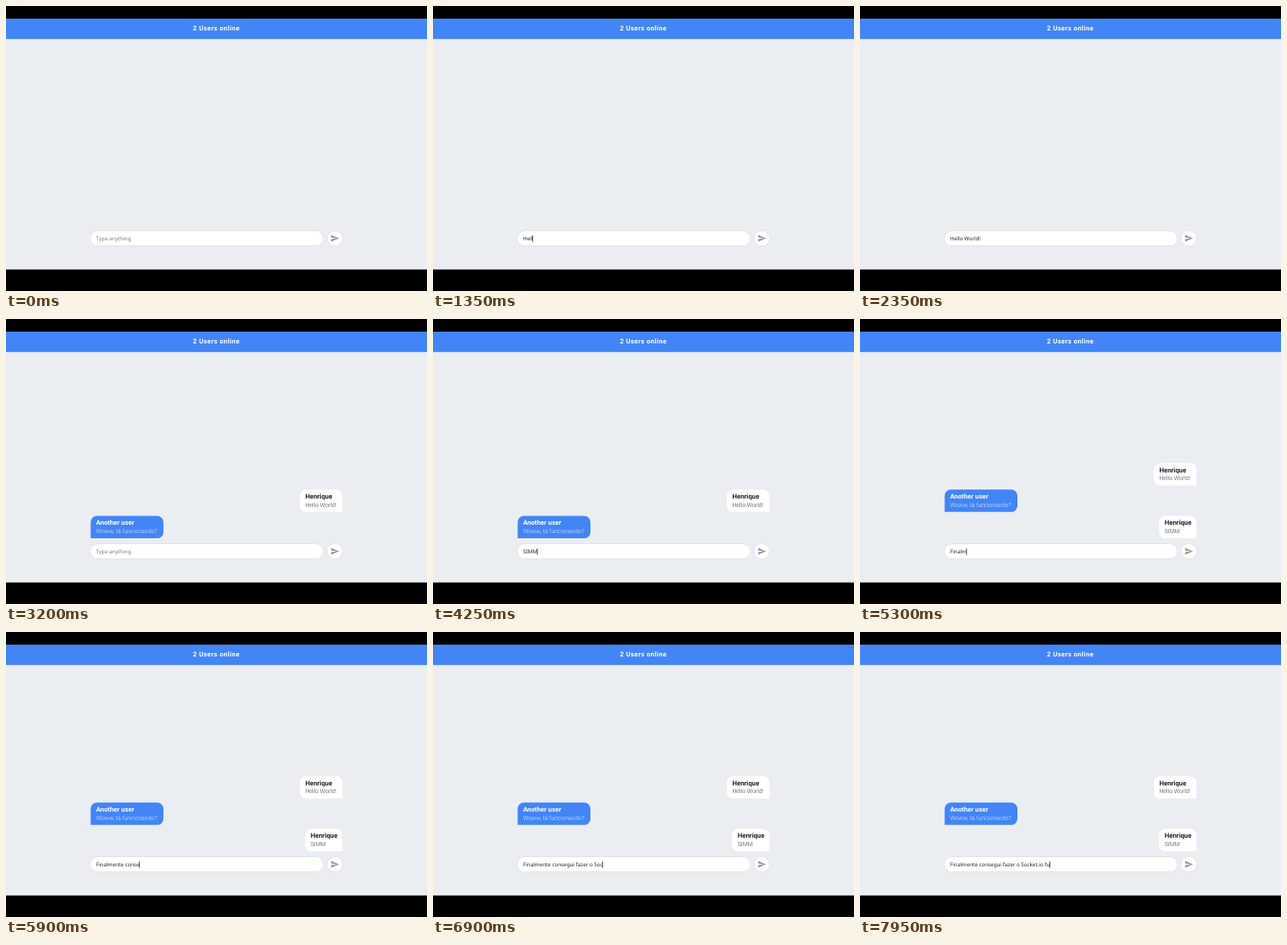
These frames come from a looping animation (500x338 px, 8000 ms). An HTML page:

```html
<!DOCTYPE html>
<html lang="pt">
<head>
<meta charset="utf-8">
<title>Chat</title>
<style>
  html, body { margin: 0; width: 100%; height: 100%; overflow: hidden; background: #000; }
  svg { display: block; width: 500px; height: 338px; }
  text { white-space: pre; font: 300 7.03px Roboto, sans-serif; text-rendering: geometricPrecision; }
  .title { font-size: 7.81px; font-weight: 700; letter-spacing: .39px; fill: #fff; }
  .name { font-size: 7.81px; font-weight: 700; }
  .own path { fill: #fff; }
  .own text { fill: #3a3d44; }
  .own .name { fill: #1d2029; }
  .other path { fill: #4285f7; }
  .other text { fill: #e6effe; }
  .other .name { fill: #fff; }
  .field { fill: #fff; filter: drop-shadow(0 .8px .6px rgba(0, 0, 0, .35)); }
  #input { font: 400 6.25px "Noto Sans", sans-serif; }
</style>
</head>
<body>
<svg viewBox="0 0 500 338">
  <rect y="15" width="500" height="297.5" fill="#eaeef3"/>
  <rect y="15" width="500" height="24.2" fill="#4285f7"/>
  <text class="title" x="222" y="29">2 Users online</text>
  <g id="messages"></g>
  <rect class="field" x="100" y="266.8" width="277" height="17.6" rx="8.8"/>
  <text id="input" x="107" y="278"></text>
  <rect id="caret" y="272" width=".7" height="7.8" fill="#222"/>
  <circle class="field" cx="390.6" cy="275.6" r="9.2"/>
  <path fill="#999" transform="translate(385.2 270.1) scale(.45)" d="M2 21 23 12 2 3v7l15 2-15 2z"/>
</svg>
<script>
const LOOP = 8000, TICK = 50, SLOT = 31.25;
const TEXT_X = 107;

const messages = [
  { at: 2650, own: true, name: 'Henrique', text: 'Hello World!', left: 348.9, right: 399.5 },
  { at: 3200, own: false, name: 'Another user', text: 'Woww, tá funcionando?', left: 100.5, right: 187 },
  { at: 4450, own: true, name: 'Henrique', text: 'SIMM', left: 355.2, right: 399.5 },
];

// Bursts of typing: text, time of first key, time of last key
const bursts = [
  ['H', 900, 900], ['el', 1050, 1150], ['lo', 1350, 1450], [' World', 1650, 2000], ['!', 2200, 2200],
  ['SIMM', 4000, 4250],
  ['Final', 4550, 4850], ['mente', 5300, 5550], [' conse', 5700, 5900], ['gui', 5950, 6050],
  [' fa', 6200, 6250], ['zer o Soc', 6400, 6900], ['ket', 7100, 7200], ['.', 7550, 7550], ['io fu', 7700, 7950],
];
const sends = [0, 2650, 4450];
const caretOff = [[0, 550], [2350, 2650], [2950, 3550]];

const input = document.getElementById('input');
const caret = document.getElementById('caret');
const list = document.getElementById('messages');

// Rounded bubble with one square bottom corner on the sender's side
function bubble({ own, name, text, left, right }) {
  const w = right - left, h = 26.5, r = 7.4;
  const corner = (x, y, square) => square ? `l${x} 0 0 ${y}` : `a${r} ${r} 0 0 1 ${x} ${y}`;
  const d = `M${r} 0H${w - r}a${r} ${r} 0 0 1 ${r} ${r}V${h - r}` +
    (own ? `V${h}H${r}` : `a${r} ${r} 0 0 1 ${-r} ${r}H0`) +
    (own ? `a${r} ${r} 0 0 1 ${-r} ${-r}` : '') + `V${r}a${r} ${r} 0 0 1 ${r} ${-r}z`;
  return `<g class="${own ? 'own' : 'other'}"><path d="${d}"/>` +
    `<text class="name" x="6.5" y="10.8">${name}</text><text x="6.5" y="20.4">${text}</text></g>`;
}

list.innerHTML = messages.map(bubble).join('');

function typedAt(t) {
  const since = sends.findLast(s => s <= t);
  return bursts.filter(b => b[1] >= since).map(([text, start, end]) => {
    const gap = (end - start) / Math.max(1, text.length - 1);
    return t < start ? '' : text.slice(0, gap ? Math.floor((t - start) / gap + 1.001) : 1);
  }).join('');
}

function draw(t) {
  const sent = messages.filter(m => m.at <= t).length;
  messages.forEach((m, i) => {
    const g = list.children[i];
    g.style.display = i < sent ? '' : 'none';
    g.setAttribute('transform', `translate(${m.left} ${233.6 - (sent - 1 - i) * SLOT})`);
  });

  const typed = typedAt(t);
  input.textContent = typed || 'Type anything';
  input.setAttribute('fill', typed ? '#222' : '#777');
  caret.setAttribute('x', TEXT_X - .3 + (typed ? input.getComputedTextLength() : 0));
  caret.style.display = caretOff.some(([a, b]) => t >= a && t < b) ? 'none' : '';
}

const start = performance.now();
function frame() {
  const t = (performance.now() - start) % LOOP;
  draw(Math.floor(t / TICK) * TICK);
  requestAnimationFrame(frame);
}
frame();
</script>
</body>
</html>
```
